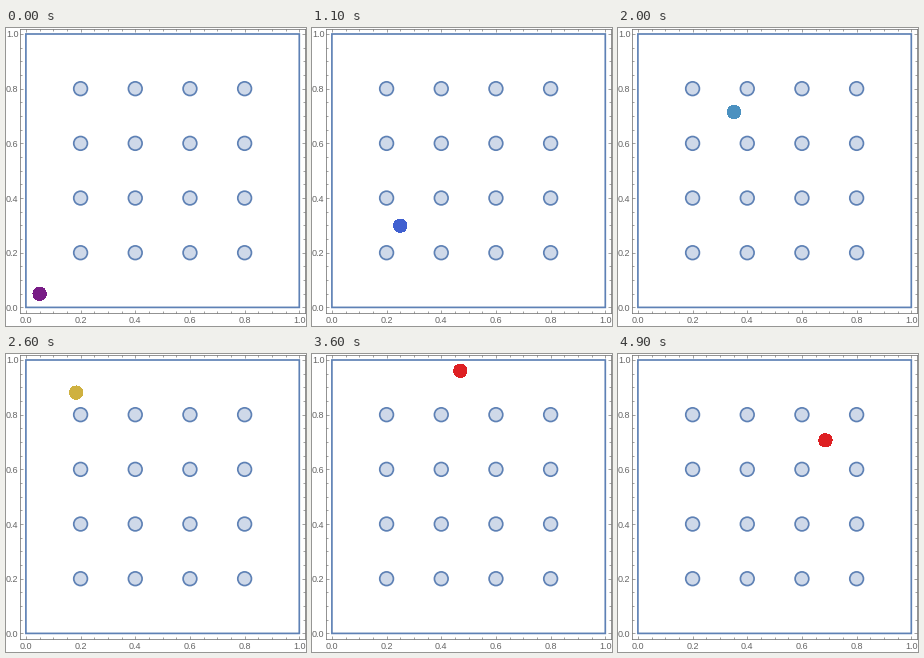
A matplotlib script that plays this animation: 300 by 298 pixels, repeating every 5000 ms.

```python
import numpy as np
import matplotlib.pyplot as plt
from matplotlib.animation import FuncAnimation
from matplotlib.colors import LinearSegmentedColormap
from matplotlib.patches import Circle, Rectangle

W, H, DPI = 300, 298, 100
PX = 72 / DPI                      # points per pixel
FRAMES, INTERVAL = 50, 100
LEFT, BOTTOM, SCALE = 19.9, 279.4, 273.4   # unit square on the stage, in pixels
PAD = 0.02

BLUE, PALE, GRAY = "#5e81b5", "#cfd9e9", "#666666"
HEAT = LinearSegmentedColormap.from_list("heat", [
    (0.0, "#781c86"), (0.3, "#4060d0"), (0.4, "#4b91c0"),
    (0.5, "#65ae96"), (0.7, "#cfb240"), (1.0, "#de2023")])

PEG, REACH = 0.025, 0.0215         # peg radius, ball radius in contact
RESTITUTION = 0.99
START, END = (0.05, 0.05), (0.686, 0.706)
WALLS = {"left": (0, REACH), "floor": (1, REACH), "top": (1, 1 - REACH)}
# Obstacles in the order they are hit; two digits are a peg's column and row.
HITS = "21 33 12 floor 24 left top 33 34 33 top 24 top 44 top 34 top".split()


def unit(v):
    return v / np.linalg.norm(v)


def first_guess(hit):
    if hit in WALLS:
        axis, value = WALLS[hit]
        point = np.full(2, 0.5)
        point[axis] = value
        return point
    return np.array([int(digit) / 5 for digit in hit])


def bounce_point(hit, before, here, after):
    """Where a mirror-like bounce between two neighbours touches the obstacle."""
    if hit in WALLS:
        axis, value = WALLS[hit]
        a, b = abs(before[axis] - value), abs(after[axis] - value)
        point = (before * b + after * a) / (a + b)
        point[axis] = value
        return point
    normal = unit(unit(before - here) + unit(after - here))
    return first_guess(hit) + (PEG + REACH) * normal


def billiard_path(sweeps=150):
    points = np.array([START, *map(first_guess, HITS), END])
    for _ in range(sweeps):
        for i, hit in enumerate(HITS, 1):
            points[i] = bounce_point(hit, *points[i - 1:i + 2])
    return points


def arrival_times(points):
    """Each bounce costs speed in proportion to how head-on it is."""
    steps = np.diff(points, axis=0)
    lengths = np.linalg.norm(steps, axis=1)
    dirs = steps / lengths[:, None]
    head_on = (1 - (dirs[:-1] * dirs[1:]).sum(axis=1)) / 2
    kept = np.sqrt(1 - (1 - RESTITUTION ** 2) * head_on)
    speed = np.cumprod([1, *kept])
    times = np.cumsum([0, *(lengths / speed)])
    return times * (FRAMES - 1) / times[-1]


path = billiard_path()
times = arrival_times(path)

fig = plt.figure(figsize=(W / DPI, H / DPI), dpi=DPI, facecolor="white")
span = SCALE * (1 + 2 * PAD)
ax = fig.add_axes([(LEFT - PAD * SCALE) / W,
                   (H - BOTTOM - PAD * SCALE) / H,
                   span / W, span / H])
ax.set(xlim=(-PAD, 1 + PAD), ylim=(-PAD, 1 + PAD))

major = np.arange(6) / 5
minor = np.arange(21) / 20
labels = [f"{v:.1f}" for v in major]
for axis in (ax.xaxis, ax.yaxis):
    axis.set_ticks(major, labels, fontname="Liberation Sans", fontsize=9 * PX)
    axis.set_ticks(minor, minor=True)
ax.tick_params(which="both", direction="in", top=True, right=True,
               color=GRAY, labelcolor=GRAY, width=0.6 * PX)
ax.tick_params(which="major", length=3.2 * PX)
ax.tick_params(which="minor", length=1.9 * PX)
ax.tick_params(axis="x", pad=3 * PX)
ax.tick_params(axis="y", pad=2 * PX)
for spine in ax.spines.values():
    spine.set(color=GRAY, linewidth=0.7 * PX)

outline = dict(ec=BLUE, lw=1.7 * PX)
ax.add_patch(Rectangle((0, 0), 1, 1, fill=False, snap=False, **outline))
for row in major[1:5]:
    for col in major[1:5]:
        ax.add_patch(Circle((col, row), PEG, fc=PALE, **outline))

ball = ax.add_patch(Circle(START, 6.6 / SCALE, lw=0, zorder=5, antialiased=False))


def update(frame):
    ball.center = [np.interp(frame, times, coord) for coord in path.T]
    hits = np.searchsorted(times, frame, side="right") - 1
    ball.set_facecolor(HEAT(min(hits / 10, 1.0)))
    return ball,


anim = FuncAnimation(fig, update, frames=FRAMES, interval=INTERVAL,
                     repeat=True, repeat_delay=0)
plt.show()
```
